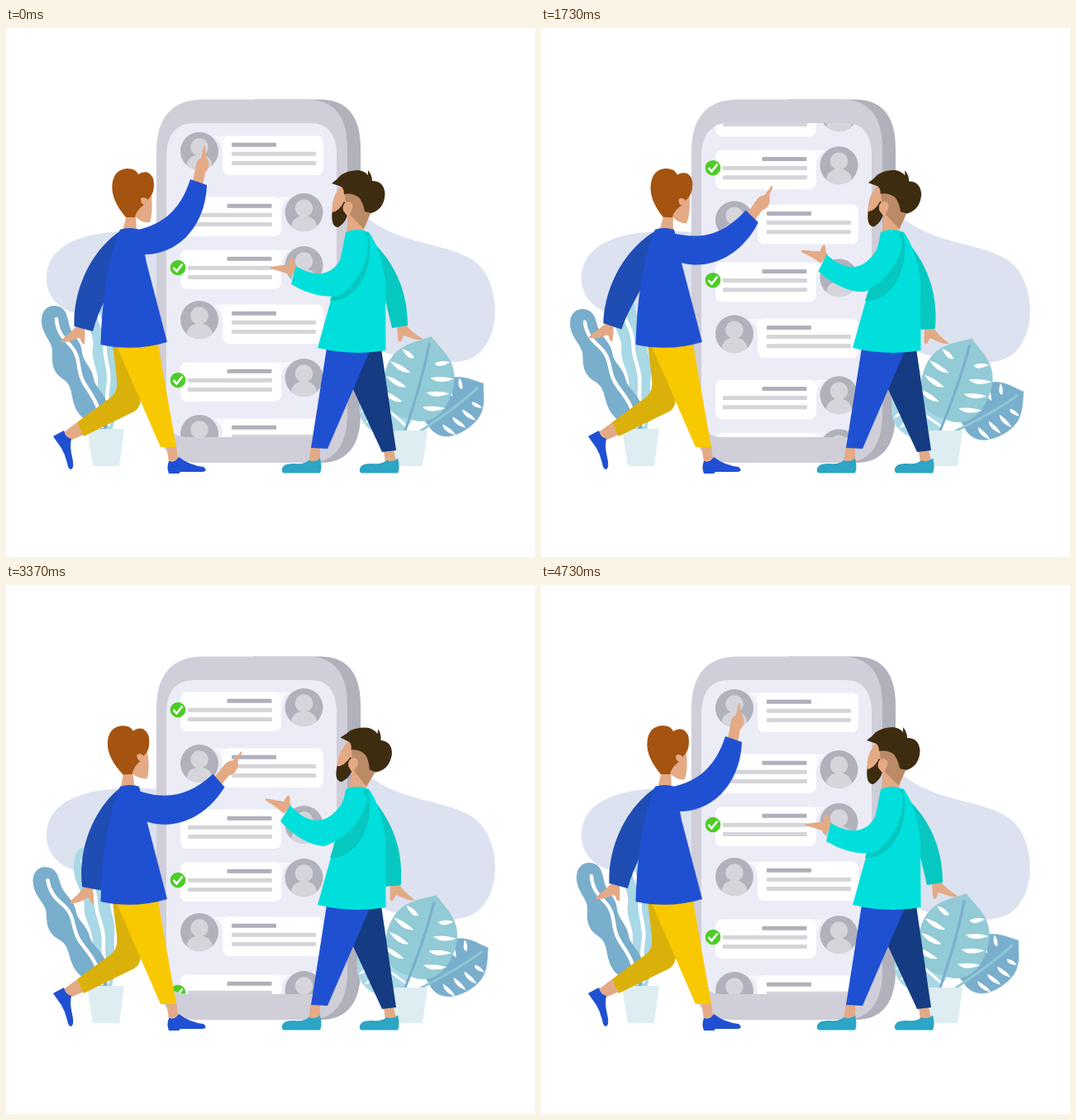
Write an HTML page that moves like this. It is 640x640 px and loops after 4.76 s.

```html
<!DOCTYPE html>
<html lang="en">
<head>
<meta charset="utf-8">
<title>Chat list</title>
<style>
html, body { margin: 0; width: 100%; height: 100%; overflow: hidden; background: #fff; }
svg { display: block; width: 100vw; height: 100vh; }
</style>
</head>
<body>
<svg viewBox="0 0 640 640">
  <defs>
    <path id="screen" d="M194 152Q196 115 228 115H368Q399 115 400 152V480Q400 495 380 495H220Q194 495 194 470Z"/>
    <clipPath id="clip"><use href="#screen"/></clipPath>
    <g id="avatar">
      <circle r="23" fill="#b1b1bb"/>
      <circle cy="-5" r="10.7" fill="#d5d5db"/>
      <path d="M-15.5 17C-14 0 14 0 15.5 17A23 23 0 0 1-15.5 17Z" fill="#d5d5db"/>
    </g>
    <g id="check">
      <circle r="9.3" fill="#4ccd26"/>
      <path d="M-5.5 0L-1.5 4.3L5.5-4.5" fill="none" stroke="#fff" stroke-width="2.6"/>
    </g>
    <path id="shoe" d="M334 533Q336 526 349 527Q362 528 366 523Q374 526 380 520.500Q383 532 380 538.500H336Q333 537 334 533Z" fill="#2da5c4"/>
  </defs>

  <path fill="#dce2f0" d="M184 247C130 243 49 247 49 303C49 334 78 349 108 349C150 349 190 340 230 380H430C470 402 530 412 562 400C602 382 602 300 560 278C525 258 465 262 425 218L400 250H200Z"/>

  <path fill="#b1b1bb" d="M300 86.500H382Q429 88 429 146V470Q427 526 380 526H300Z"/>
  <path fill="#cfced9" d="M236 86.500H366Q413 88 413 146V470Q411 526 366 526H230Q182 525 182 470V146Q184 88 236 86.500Z"/>
  <use href="#screen" fill="#ececf7"/>
  <g clip-path="url(#clip)"><g id="list"></g></g>

  <g id="backFrond"><g transform="rotate(7 125 487)">
    <path fill="#a9d8e6" d="M125 487C110 474 106 452 104 430C103 416 92 404 93 390C94 376 83 366 80 350C78 332 82 318 92 318C106 318 106 336 110 348C114 360 124 366 124 382C124 396 131 404 130 420C129 440 133 460 128 487Z"/>
    <path fill="none" stroke="#fff" stroke-width="4.500" stroke-linecap="round" d="M90 334C92 354 106 362 107 384C108 404 118 412 117 434C116 452 121 464 123 480"/>
  </g></g>
  <g id="frontFrond">
    <path fill="#7aaecd" d="M122 487C104 482 87 472 82 454C78 440 80 432 68 424C54 414 56 402 56 390C56 380 43 370 43 354C43 340 52 335 60 336C74 338 74 350 77 361C80 372 91 378 92 392C93 404 104 410 106 424C108 436 121 442 125 462Z"/>
    <path fill="none" stroke="#fff" stroke-width="4.500" stroke-linecap="round" d="M61 352C62 366 68 374 76 382C90 396 86 408 91 422C96 438 112 446 116 482"/>
  </g>
  <path fill="#deedf1" d="M98 485H143L137 530H105Z"/>

  <g id="smallLeaf"></g>
  <g id="sideLeaf"></g>
  <g id="tallLeaf"></g>
  <path fill="#deedf1" d="M466 487H510L504 530H472Z"/>

  <!-- left man -->
  <g id="backArm1">
    <path fill="#e4aa86" d="M84 362L95 363Q96 372 95 382Q91 383 90 376L87 375Q76 381 66 380Q66 377 76 370Z"/>
    <path fill="#1f4db3" d="M139 245C104 268 81 315 82.500 361L105 367C112 340 128 315 136 290Z"/>
  </g>
  <path fill="#e4aa86" d="M86 477L94 492L78 499L70 489ZM194 505H206L208 522L197 525Z"/>
  <path fill="#2050d2" d="M57 494L70 487Q72 495 79 497Q77 507 80 519Q83 532 79 534Q75 534 74 526Q71 513 64 504Z"/>
  <path fill="#2050d2" d="M197 524Q205 526 209 519Q222 529 239 531Q245 536 238 537H210V539H197Q194 532 197 524Z"/>
  <path fill="#dab10a" d="M129 383L185 383L163 450Q162 460 155 464L94 494L86 477L128 446Q136 439 134 424Z"/>
  <path fill="#f8c800" d="M133 383H184L206 507H187Z"/>
  <path fill="#2050d2" d="M138 244Q150 240 161 244Q167 265 170 284L195 380Q155 392 114.500 383Q117 295 138 244Z"/>
  <g id="head1">
    <path fill="#e4aa86" d="M146 226L157 226L158 246H141ZM160 200L176 203Q178 224 174 235Q166 237 156 228Z"/>
    <path fill="#a55310" d="M128.500 190Q130 171 147 170Q157 170 160 177Q166 173 172 175Q179 179 179 189Q179 201 173 206L168 213Q158 220 156 229H145Q127 208 128.500 190Z"/>
    <path fill="#e4aa86" d="M171 207Q165 203 163 207Q163 212 167 214L171 213Z"/>
  </g>
  <path fill="#2050d2" d="M138 244Q150 240 161 244L158 262H134Z"/>
  <g id="arm1">
    <path fill="#e4aa86" d="M226 186L229 170Q230 160 236 157L239 143Q242 141 241 153L245 161Q247 169 241 175L238 190Z"/>
    <path fill="#2050d2" d="M150 246C186 240 210 224 223 183L243 190C241 242 206 276 164 274Q150 274 143 264Z"/>
  </g>

  <!-- right man -->
  <g id="backArm2">
    <path fill="#e4aa86" d="M473 360L484 359Q488 366 504 376Q500 379 490 375L481 372L478 379Q475 381 474 376Z"/>
    <path fill="#06c8c0" d="M441 256C475 288 486 325 486 360L467 363L452 300Z"/>
  </g>
  <path fill="#e4aa86" d="M369 505L380 507L380 525L366 527ZM457 511L469 510L472 524L459 527Z"/>
  <use href="#shoe"/><use href="#shoe" x="94"/>
  <path fill="#153c82" d="M436 388H454L472 511L455 513L419 435Z"/>
  <path fill="#2050d2" d="M388 387L440 391L389 509L369 508Z"/>
  <g id="head2">
    <path fill="#bb8a66" d="M408 198Q426 196 434 208L442 222L433 243L414 228Z"/>
    <path fill="#e4aa86" d="M406 190Q397 200 395 212L394 223Q404 226 411 212L409 196ZM414 224L419 229L433 243L432 250H412Z"/>
    <path fill="#3e2c10" d="M394.500 223Q403 222 409 210L414 215Q415 233 402 241Q393 241 394.500 223Z"/>
    <path fill="#e4aa86" d="M408 221Q406 211 414 210Q421 211 419 219Q416 223 415 230Z"/>
    <path fill="#3e2c10" d="M394 188Q401 183 405 178Q414 172 426 172Q434 173 438 178L438 172Q443 178 443 185Q457 185 458.500 200Q458 219 442 224L434 222Q432 211 427 205Q419 199 409 201Q409 192 403 191Z"/>
  </g>
  <path fill="#00dfdc" d="M411 247Q424 241 439 247Q454 268 459 308L459.500 390Q420 397 377 387L394 326L407 268Z"/>
  <path fill="#06c8c0" d="M438 247C448 290 424 332 392 330L402 300L434 248Z"/>
  <g id="arm2">
    <path fill="#e4aa86" d="M352 288L346 300Q334 294 321 291.500Q317 289 323 288.500L342 286Q343 277 345.500 277Q348 278 349 285Z"/>
    <path fill="#00dfdc" d="M350.500 288C376 303 398 301 409 270L412 250Q426 240 437 252C441 275 429 305 405 323C386 328 364 321 345 310Z"/>
  </g>
</svg>
<script>
const LOOP = 4760, END = 4730, PERIOD = 342;
const el = id => document.getElementById(id);

// Swings about a pivot: one slow sway per loop, plus a beat twice per loop.
const joints = {
  frontFrond: { at: "120 485", sway: -3, lag: 0.46 },
  backFrond: { at: "125 487", sway: -3.9, lag: 0.46 },
  tallLeaf: { at: "484 487", sway: 2.3, lag: 0.16 },
  sideLeaf: { at: "500 487", sway: 4.7, lag: 0.16 },
  smallLeaf: { at: "484 487", sway: -4.7, lag: 0.16 },
  backArm1: { at: "138 250", sway: 5, lag: -Math.PI / 2 },
  head1: { at: "150 290", sway: 3.3, lag: -Math.PI / 2 },
  arm1: { at: "150 258", sway: 13.8, lag: 0.22, beat: 5.1, beatLag: -0.2 },
  backArm2: { at: "440 258", sway: 1.65, lag: -0.44, beat: 1.8 },
  head2: { at: "426 268", sway: -3.1, beat: 5.9 },
  arm2: { at: "418 255", sway: -2, beat: 11.3, beatLag: 0.22 }
};

// Zero at the start of the loop, whatever the lag.
const swing = (phase, size, lag) => size * (Math.cos(lag) - Math.cos(phase - lag));

// The list glides to a slow drift, then is flicked on: [time, distance].
const glide = [[0, 0], [1330, 421], [2070, 483], [2930, 531], [3370, 617], [4130, 813], [END, 3 * PERIOD]];

function scrollAt(t) {
  const n = glide.length - 1;
  const span = i => glide[(i + n) % n + 1][0] - glide[(i + n) % n][0];
  const speed = i => (glide[(i + n) % n + 1][1] - glide[(i + n) % n][1]) / span(i);
  const tangent = i => (speed(i - 1) * span(i) + speed(i) * span(i - 1)) / (span(i) + span(i - 1));
  let i = 0;
  while (i < n - 1 && t >= glide[i + 1][0]) i++;
  const h = span(i), u = (t - glide[i][0]) / h, v = 1 - u;
  return glide[i][1] * v * v * (1 + 2 * u) + glide[i + 1][1] * u * u * (3 - 2 * u)
    + h * u * v * (tangent(i) * v - tangent(i + 1) * u);
}

function row(y, right, checked) {
  const x = right ? 211 : 262, text = right ? 220 : 273;
  const bar = (bx, by, w, c) => `<rect x="${bx}" y="${by}" width="${w}" height="5" rx="1" fill="${c}"/>`;
  const tail = right ? "M320-18.500H345Q334-13 333 0H320Z" : "M275-18.500H250Q261-13 262 0H275Z";
  return `<g transform="translate(0 ${y})"><path d="${tail}" fill="#f8f8fc"/>`
    + `<rect x="${x}" y="-18.500" width="122" height="47.500" rx="8" fill="#fff"/>`
    + bar(right ? 267.5 : 273, -10.3, 54, "#b0b0bb") + bar(text, 0.8, 102, "#d5d5d9") + bar(text, 12, 102, "#d5d5d9")
    + `<use href="#avatar" x="${right ? 360.5 : 234}"/>`
    + (checked ? '<use href="#check" x="208" y="3"/>' : "") + "</g>";
}

// Heart-shaped leaf growing up from its base, with crescent cuts on both sides.
function leaf(x, y, turn, len, wide, fill, rib) {
  const half = s => `M0 ${-len}C${s * wide * 0.4} ${-len * 0.88} ${s * wide} ${-len * 0.8} ${s * wide} ${-len * 0.46}`
    + `C${s * wide} ${-len * 0.05} ${s * wide * 0.4} ${len * 0.03} 0 0Z`;
  let cuts = "";
  for (const s of [-1, 1])
    for (let i = 0; i < 4; i++) {
      const cy = -len * (0.17 + 0.18 * i), reach = wide * (i == 3 ? 0.72 : 0.95);
      const rise = len * 0.06;
      cuts += `M${s * wide * 0.3} ${cy}Q${s * reach * 0.6} ${cy + rise} ${s * reach} ${cy - rise}`
        + `Q${s * reach * 0.7} ${cy - rise * 1.2} ${s * wide * 0.3} ${cy}Z`;
    }
  return `<g transform="translate(${x} ${y}) rotate(${turn})">`
    + `<path d="${half(-1) + half(1)}" fill="${fill}" stroke="${fill}" stroke-width=".6"/><path d="${cuts}" fill="#fff"/>`
    + `<path d="M0 ${8 - len}Q4 ${-len / 2} 0 18" fill="none" stroke="${rib}" stroke-width="3"/></g>`;
}

el("tallLeaf").innerHTML = leaf(487, 472, 15.5, 102, 42, "#92cad6", "#7aaecd");
el("sideLeaf").innerHTML = leaf(511, 480, 53, 83, 32, "#7aaecd", "#8fc8d4");
el("smallLeaf").innerHTML = leaf(484, 483, -50, 70, 30, "#a9d8e6", "#fff");

const rows = [[149, 0, 0], [223, 1, 0], [287, 1, 1], [353, 0, 0], [423, 1, 1]];
let html = "";
for (let k = -1; k < 3; k++)
  for (const [y, right, checked] of rows) html += row(y + k * PERIOD, right, checked);
el("list").innerHTML = html;

function draw(now) {
  const t = Math.min(now % LOOP, END), phase = 2 * Math.PI * t / END;
  for (const id in joints) {
    const { at, sway, lag = 0, beat = 0, beatLag = 0 } = joints[id];
    const angle = swing(phase, sway, lag) + swing(2 * phase, beat, beatLag);
    el(id).setAttribute("transform", `rotate(${angle} ${at})`);
  }
  el("list").setAttribute("transform", `translate(0 ${-(scrollAt(t) % PERIOD)})`);
}

let start;
function tick(now) {
  start ??= now;
  draw(now - start);
  requestAnimationFrame(tick);
}
draw(0);
requestAnimationFrame(tick);
</script>
</body>
</html>
```
